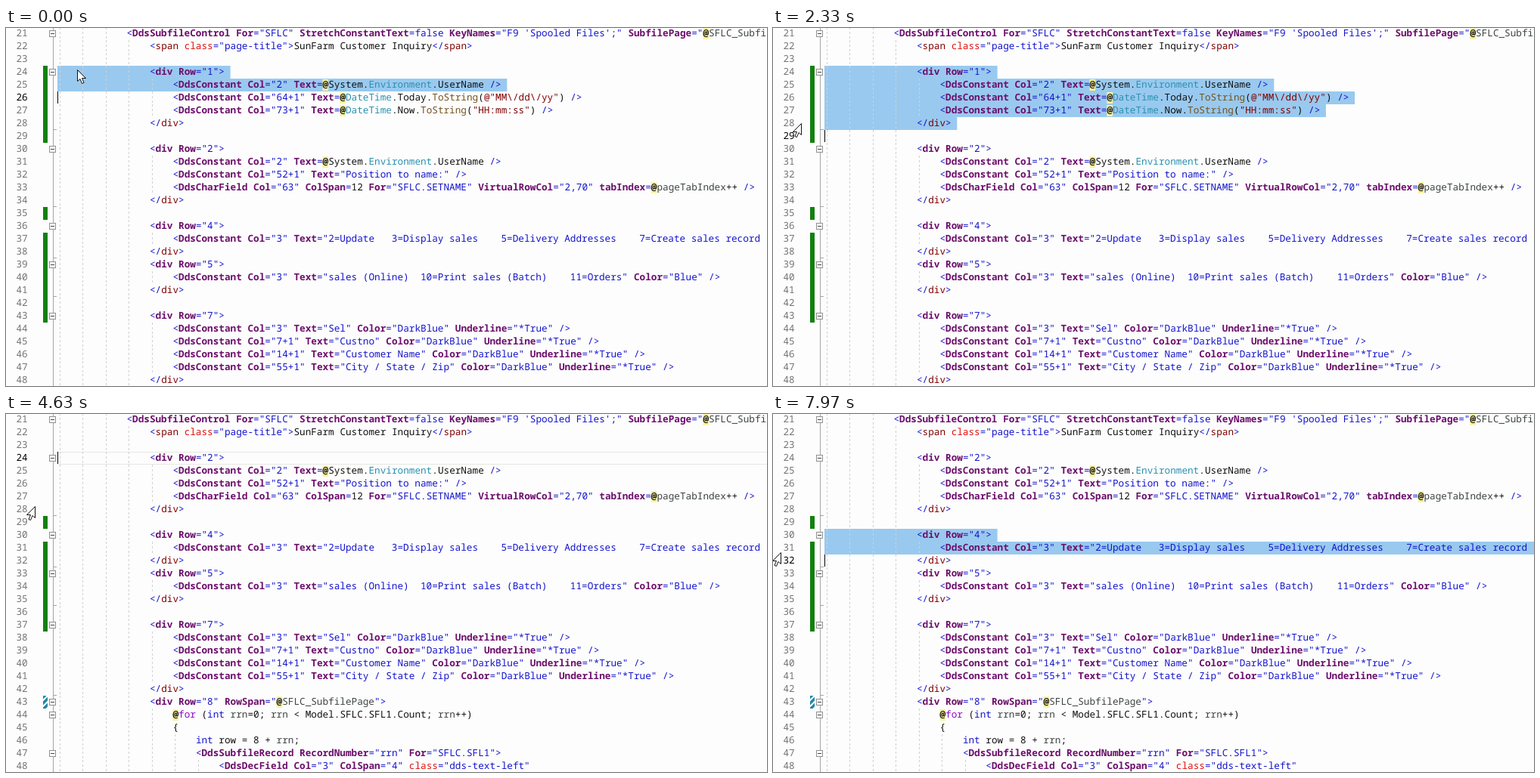
Animation of 1006 by 474 pixels, one loop 8000 ms. Source, as an HTML page with a canvas:

```html
<!DOCTYPE html>
<html lang="en">
<head>
<meta charset="utf-8">
<title>Code editor</title>
<style>
html, body { margin: 0; width: 100%; height: 100%; overflow: hidden; background: #fdfdfd; }
canvas { display: block; }
</style>
</head>
<body>
<canvas id="stage" width="1006" height="474"></canvas>
<script>
const LOOP = 8000, W = 1006, H = 474;
const FIRST = 21, ROW = 17, LEFT = 68, CHAR = 7.62, BLINK = 530;
const FONT = '12.7px "Noto Sans Mono", "DejaVu Sans Mono", monospace';
const CLICK = 300, DRAG = 1750, DROP = 2250, CUT = 4500, DRAG2 = 7350, DROP2 = 7850;
const BLUE = '#1414cc', PURPLE = '#6c0f6c', INK = '#111';

const ctx = document.getElementById('stage').getContext('2d');

const before = String.raw`
            <DdsSubfileControl For="SFLC" StretchConstantText=false KeyNames="F9 'Spooled Files';" SubfilePage="@SFLC_SubfilePage"
                <span class="page-title">SunFarm Customer Inquiry</span>

                <div Row="1">
                    <DdsConstant Col="2" Text=@System.Environment.UserName />
                    <DdsConstant Col="64+1" Text=@DateTime.Today.ToString(@"MM\/dd\/yy") />
                    <DdsConstant Col="73+1" Text=@DateTime.Now.ToString("HH:mm:ss") />
                </div>

                <div Row="2">
                    <DdsConstant Col="2" Text=@System.Environment.UserName />
                    <DdsConstant Col="52+1" Text="Position to name:" />
                    <DdsCharField Col="63" ColSpan=12 For="SFLC.SETNAME" VirtualRowCol="2,70" tabIndex=@pageTabIndex++ />
                </div>

                <div Row="4">
                    <DdsConstant Col="3" Text="2=Update   3=Display sales    5=Delivery Addresses    7=Create sales record   
                </div>
                <div Row="5">
                    <DdsConstant Col="3" Text="sales (Online)  10=Print sales (Batch)    11=Orders" Color="Blue" />
                </div>

                <div Row="7">
                    <DdsConstant Col="3" Text="Sel" Color="DarkBlue" Underline="*True" />
                    <DdsConstant Col="7+1" Text="Custno" Color="DarkBlue" Underline="*True" />
                    <DdsConstant Col="14+1" Text="Customer Name" Color="DarkBlue" Underline="*True" />
                    <DdsConstant Col="55+1" Text="City / State / Zip" Color="DarkBlue" Underline="*True" />
                </div>`.split('\n').slice(1);

const tail = `
                <div Row="8" RowSpan="@SFLC_SubfilePage">
                    @for (int rrn=0; rrn < Model.SFLC.SFL1.Count; rrn++)
                    {
                        int row = 8 + rrn;
                        <DdsSubfileRecord RecordNumber="rrn" For="SFLC.SFL1">
                            <DdsDecField Col="3" ColSpan="4" class="dds-text-left"`.split('\n').slice(1);

// pattern, colour, bold
const rules = [
  [/\s+/y],
  [/@?"[^"]*"(?=\))/y, '#800000'],
  [/"[^"@]*("|$)/y, BLUE],
  [/"/y, BLUE],
  [/<\/?(?=\w)/y, BLUE],
  [/\/?>/y, BLUE],
  [/(?<=<)span|(?<=<\/)\w+/y, '#800000'],
  [/(?<=<)\w+/y, PURPLE, true],
  [/class(?==)/y, '#e01010'],
  [/[A-Zt]\w*(?==)/y, PURPLE, true],
  [/=(?=["@f1])/y, BLUE],
  [/@/y, INK, true],
  [/(?<=@)for/y, '#8f08c4'],
  [/(false|int)\b/y, BLUE],
  [/Environment|DateTime/y, '#2b91af'],
  [/ToString/y, '#74531f'],
  [/pageTabIndex|SFLC_\w+|rrn/y, '#3c4440'],
  [/\w+/y, INK],
  [/./y, INK]
];

function tokens(line) {
  const out = [];
  for (let col = 0; col < line.length;) {
    for (const [re, color, bold] of rules) {
      re.lastIndex = col;
      const hit = re.exec(line);
      if (!hit) continue;
      if (color) out.push({ col, text: hit[0], color, bold });
      col += hit[0].length;
      break;
    }
  }
  return out;
}

function makeDoc(lines, changes, hatch) {
  const rows = lines.map(text => ({
    text,
    tokens: tokens(text),
    indent: text ? text.search(/\S/) : 16,
    opens: /^\s*(<div|<DdsSubfile|@for)/.test(text),
    closes: /^\s*<\/div/.test(text)
  }));
  return { rows, changes, hatch };
}

const docA = makeDoc(before, [[24, 29], [35, 35], [37, 43]]);
const docB = makeDoc([...before.slice(0, 3), ...before.slice(9), ...tail], [[29, 29], [31, 37]], 43);

// time, x, y of the pointer tip
const path = [
  [0, 94, 55], [650, 94, 56], [1350, 31, 57], [DRAG, 31, 58], [DROP, 37, 126],
  [4270, 38, 122], [4750, 38, 122], [5650, 56, 195], [5900, 56, 195],
  [6870, 20, 157], [DRAG2, 12, 160], [DROP2, 10, 183], [LOOP, 10, 183]
];

function pointer(t) {
  const i = path.findIndex(p => p[0] > t);
  const [t0, x0, y0] = path[i - 1], [t1, x1, y1] = path[i];
  const u = (t - t0) / (t1 - t0), e = u * u * (3 - 2 * u);
  return { x: x0 + (x1 - x0) * e, y: y0 + (y1 - y0) * e };
}

const rowTop = n => (n - FIRST) * ROW - 1;
const lineAt = y => FIRST + Math.floor((y + 1) / ROW);

function state(t, mouse) {
  const select = (from, to, since) => ({ sel: [from, to], line: to + 1, col: 0, since });
  if (t < CLICK) return select(24, 25, 0);
  if (t < DRAG) return { line: 24, col: 3, since: CLICK };
  if (t < CUT) return select(24, lineAt(mouse.y), DROP);
  if (t < DRAG2) return { line: 24, col: 0, since: CUT };
  return select(30, lineAt(mouse.y), DROP2);
}

function box(x, y, w, h, color) {
  ctx.fillStyle = color;
  ctx.fillRect(x, y, w, h);
}

function drawGuides(row, y) {
  ctx.strokeStyle = '#d0d0d0';
  ctx.setLineDash([3, 3]);
  for (let c = 0; c < row.indent; c += 4) {
    const x = Math.round(LEFT + c * CHAR + 3) + .5;
    ctx.beginPath();
    ctx.moveTo(x, y);
    ctx.lineTo(x, y + ROW);
    ctx.stroke();
  }
  ctx.setLineDash([]);
}

function drawFold(row, y) {
  if (row.closes) box(62, y + 16, 5, 1, '#a5a5a5');
  if (!row.opens) return;
  box(57, y + 4, 9, 9, '#909090');
  box(58, y + 5, 7, 7, '#fdfdfd');
  box(59, y + 8, 5, 1, '#444');
}

function drawText(row, y) {
  for (const k of row.tokens) {
    const x = LEFT + k.col * CHAR;
    if (k.text === '@') box(x, y + 1, CHAR, ROW - 2, '#fbf3a0');
    ctx.font = (k.bold ? 'bold ' : '') + FONT;
    ctx.fillStyle = k.color;
    ctx.fillText(k.text, x, y + 12);
  }
}

function drawChanges(doc, mouse) {
  for (const [a, b] of doc.changes) {
    const y = rowTop(a), h = (b - a + 1) * ROW;
    const hover = mouse.x >= 48 && mouse.x < 57 && mouse.y >= y && mouse.y < y + h;
    box(hover ? 48 : 49, y, hover ? 9 : 6, h, '#138010');
  }
  if (!doc.hatch) return;
  const y = rowTop(doc.hatch);
  ctx.save();
  ctx.beginPath();
  ctx.rect(49, y, 6, ROW);
  ctx.clip();
  box(49, y, 6, ROW, '#2088a8');
  ctx.strokeStyle = '#fff';
  ctx.lineWidth = 2;
  for (let k = 5; k < 26; k += 8) {
    ctx.beginPath();
    ctx.moveTo(48, y + k + 2);
    ctx.lineTo(56, y + k - 6);
    ctx.stroke();
  }
  ctx.restore();
}

function drawPointer({ x, y }) {
  ctx.save();
  ctx.translate(Math.round(x) + .5, Math.round(y) + .5);
  if (x < 57) ctx.scale(-1, 1);
  ctx.beginPath();
  [[0, 0], [0, 15], [3.5, 12], [6, 18], [8.5, 17], [6, 11], [11, 11]].forEach(p => ctx.lineTo(...p));
  ctx.closePath();
  ctx.fillStyle = '#fff';
  ctx.fill();
  ctx.strokeStyle = '#111';
  ctx.stroke();
  ctx.restore();
}

function draw(t) {
  const mouse = pointer(t), view = state(t, mouse);
  const doc = t < CUT ? docA : docB;
  ctx.lineWidth = 1;
  box(0, 0, W, H, '#fdfdfd');
  if (!view.sel) {
    box(LEFT, rowTop(view.line), W, 1, '#e6e6e0');
    box(LEFT, rowTop(view.line) + 16, W, 1, '#e6e6e0');
  }
  box(62, 0, 1, H, '#a5a5a5');
  doc.rows.forEach((row, i) => {
    const n = FIRST + i, y = rowTop(n);
    if (view.sel && n >= view.sel[0] && n <= view.sel[1]) {
      box(LEFT, y, (row.text.length + 1) * CHAR, ROW, '#99c9ef');
    }
    drawGuides(row, y);
    drawFold(row, y);
    drawText(row, y);
    ctx.font = FONT;
    ctx.fillStyle = n === view.line ? '#000' : '#757575';
    ctx.fillText(n, 13.5, y + 12);
  });
  drawChanges(doc, mouse);
  const blink = Math.floor(Math.max(0, t - view.since) / BLINK);
  if (blink % 2 === 0) box(Math.round(LEFT + view.col * CHAR), rowTop(view.line), 1, ROW - 1, '#000');
  drawPointer(mouse);
}

ctx.textRendering = 'geometricPrecision';
const start = performance.now();
function frame() {
  draw((performance.now() - start) % LOOP);
  requestAnimationFrame(frame);
}
frame();
</script>
</body>
</html>
```
